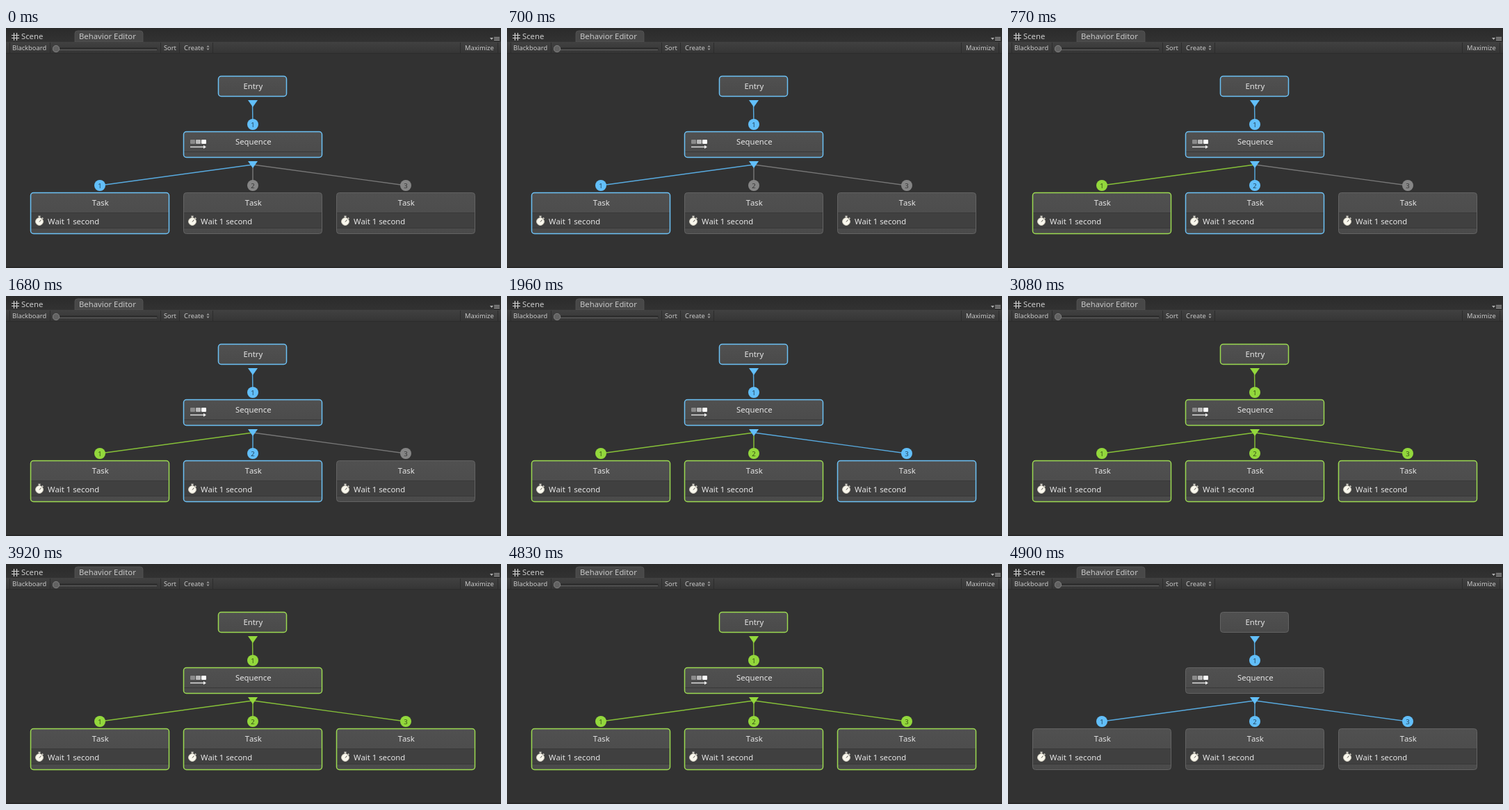
These frames come from a looping animation (712 by 346 pixels, 4.97 s). An HTML page:

```html
<!DOCTYPE html>
<html lang="en">
<head>
<meta charset="utf-8">
<title>Behavior Editor</title>
<style>
  html, body { margin: 0; width: 100%; height: 100%; overflow: hidden; background: #323232; }
  svg { display: block; width: 712px; height: 346px; }
  text { font: 11.3px "Noto Sans", "Open Sans", sans-serif; font-kerning: none; fill: #e6e6e6; }
  .mid { text-anchor: middle; }
  .bar text { font-size: 9.3px; fill: #cacaca; }
  .tab { fill: #cacaca; }
  .idle { --main: #858585; --line: #777; --edge: #636363; --ink: #343434; --width: 1; }
  .run { --main: #62bffa; --line: #58abe0; --edge: #6cc1f5; --ink: #23445c; --width: 1.5; }
  .done { --main: #93d83c; --line: #86c138; --edge: #9bd951; --ink: #355014; --width: 1.5; }
  .frame { fill: none; stroke: var(--edge); stroke-width: var(--width); }
  .link line { stroke: var(--line); stroke-width: 1.45; }
  .link circle, .link path { fill: var(--main); }
  .link text { fill: var(--ink); font-size: 9.5px; text-anchor: middle; }
</style>
</head>
<body>
<svg viewBox="0 0 712 346">
  <defs>
    <linearGradient id="head" x2="0" y2="1">
      <stop stop-color="#505050"/><stop offset="1" stop-color="#4a4a4a"/>
    </linearGradient>
    <linearGradient id="tool" x2="0" y2="1">
      <stop stop-color="#414141"/><stop offset="1" stop-color="#353535"/>
    </linearGradient>
    <linearGradient id="top" x2="0" y2="1">
      <stop stop-color="#2b2b2b"/><stop offset="1" stop-color="#323232"/>
    </linearGradient>
    <g id="watch">
      <path d="M-1.600-7.500h3.200M0-7.500v3M4-5.500l1.400 1.400" stroke="#dedbd2" stroke-width="1.4"/>
      <circle r="5.400" fill="#faf8ee" stroke="#d6d2c4"/>
      <path d="M0 .5l2.500-3" stroke="#55504a" fill="none"/>
    </g>
  </defs>
  <rect width="712" height="346" fill="#323232"/>
  <rect width="712" height="20" fill="url(#top)"/>
  <path d="M99 20V8q0-4 4-4h90q4 0 4 4v12z" fill="#484848" stroke="#5a5a5a" stroke-width=".7"/>
  <path d="M11.500 7v11M15.500 7v11M8 10.500h11M8 14.500h11" stroke="#d0d0d0" stroke-width="1.2"/>
  <text class="tab" x="22" y="16">Scene</text>
  <text class="tab" x="105" y="16">Behavior Editor</text>
  <path d="M696 14h5l-2.500 3z" fill="#b0b0b0"/>
  <path d="M702 13.500h8M702 15.500h8M702 17.500h8" stroke="#a5a5a5"/>
  <g class="bar">
    <rect y="20" width="712" height="17" fill="url(#tool)"/>
    <path d="M0 36.500h712M5.500 21v15M63.500 21v15M222.500 21v15M249.500 21v15M297.500 21v15M653.500 21v15M707.500 21v15" stroke="#2c2c2c"/>
    <rect x="66" y="28" width="152" height="4" rx="2" fill="#2f2f2f"/>
    <path d="M67 31.500h150" stroke="#646464"/>
    <circle cx="72" cy="30" r="4.700" fill="#626262" stroke="#888" stroke-width=".9"/>
    <text x="9" y="32">Blackboard</text>
    <text x="227" y="32">Sort</text>
    <text x="256" y="32">Create</text>
    <text x="660" y="32">Maximize</text>
    <path d="M288.500 27.500l2-2.500 2 2.500zM288.500 29.500l2 2.500 2-2.500z" fill="#a0a0a0"/>
  </g>
  <path d="M0 345h712" stroke="#292929" stroke-width="2"/>
  <g id="graph"></g>
</svg>
<script>
const LOOP = 4970, RESET = 4900;
const FINISH = [770, 1960, 3080];
const graph = document.getElementById('graph');

const badge = (x, y, n) =>
  `<circle cx="${x}" cy="${y}" r="8"/><text x="${x}" y="${y + 3.5}">${n}</text>`;
const arrow = y => `<path d="M348 ${y}h14l-7 10z"/>`;
const box = (x, y, w, h, title, baseline, body = '') => `<g class="node">
  <rect x="${x}" y="${y}" width="${w}" height="${h}" rx="4" fill="url(#head)"/>${body}
  <text class="mid" x="${x + w / 2 + 0.8}" y="${baseline}">${title}</text>
  <rect class="frame" x="${x}" y="${y}" width="${w}" height="${h}" rx="4"/></g>`;

const steps = `<path d="M255.500 178.500h199" stroke="#383838"/>
  <rect x="265" y="161" width="7" height="6" rx="1" fill="#8b8b8b"/>
  <rect x="273" y="161" width="7" height="6" rx="1" fill="#bbb"/>
  <rect x="281" y="161" width="7" height="6" rx="1" fill="#fff"/>
  <path d="M265 171.500h20" stroke="#eee" stroke-width="1.3"/>
  <path d="M284 169l4 2.500-4 2.500z" fill="#eee"/>`;
const wait = x => `<rect x="${x}" y="266" width="200" height="23" fill="#404040"/>
  <path d="M${x} 266.500h200M${x} 288.500h200" stroke="#383838"/>
  <use href="#watch" x="${x + 13}" y="279"/>
  <text x="${x + 25}" y="283">Wait 1 second</text>`;

const taskX = [35, 255, 475];
graph.innerHTML =
  taskX.map((x, i) => `<g class="link"><line x1="355" y1="197" x2="${x + 100}" y2="227"/>${badge(x + 100, 227, i + 1)}</g>`).join('') +
  `<g class="link"><line x1="354.500" y1="109" x2="355" y2="139"/>${badge(355, 139, 1)}${arrow(104)}${arrow(192)}</g>` +
  taskX.map(x => box(x + 0.5, 237.5, 199, 59, 'Task', 256, wait(x))).join('') +
  box(255.5, 149.5, 199, 37, 'Sequence', 168, steps) +
  box(305.5, 69.5, 98, 29, 'Entry', 88);

const links = graph.querySelectorAll('.link');
const nodes = graph.querySelectorAll('.node');

function draw(t) {
  const resetting = t >= RESET;
  const tasks = FINISH.map((end, i) =>
    t >= end ? 'done' : i === 0 || t >= FINISH[i - 1] ? 'run' : 'idle');
  const root = t >= FINISH[2] ? 'done' : 'run';
  const states = [...tasks, root, root];
  links.forEach((el, i) => el.setAttribute('class', 'link ' + (resetting ? 'run' : states[i])));
  nodes.forEach((el, i) => el.setAttribute('class', 'node ' + (resetting ? 'idle' : states[i])));
}

const start = performance.now();
function tick() {
  draw((performance.now() - start) % LOOP);
  requestAnimationFrame(tick);
}
tick();
</script>
</body>
</html>
```
